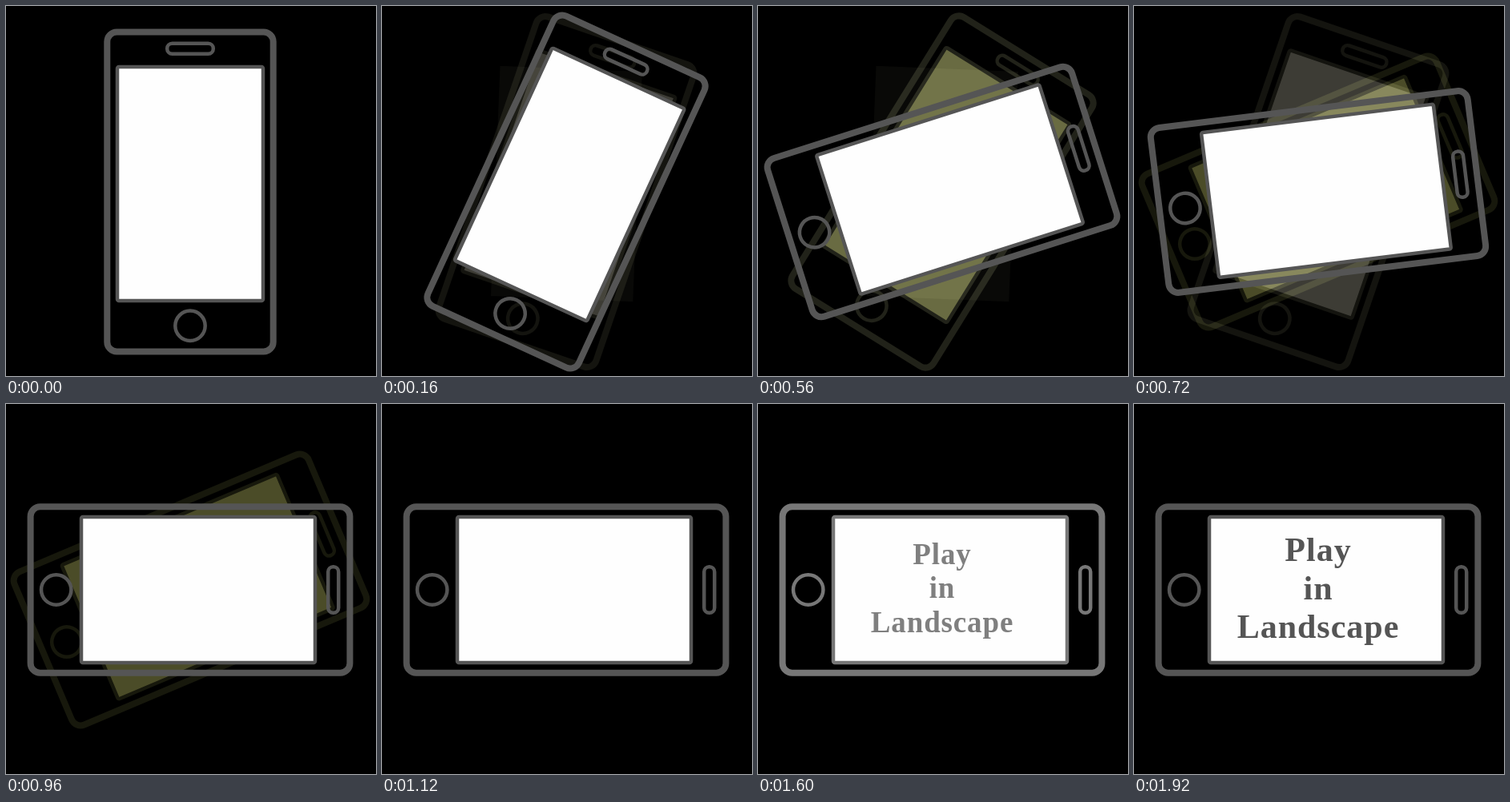
Animation, 462 px wide and 462 px high, one loop 2.4 s. Source, as an HTML page:

```html
<!DOCTYPE html>
<html lang="en">
<head>
<meta charset="utf-8">
<title>Play in Landscape</title>
<style>
  html, body { margin: 0; width: 100%; height: 100%; overflow: hidden; background: #000; }
  svg { display: block; width: 100%; height: 100%; }
  .phone { color: #555; --screen: #fefefe; }
  .ghost { mix-blend-mode: plus-lighter; }
  text {
    font: bold 42px "Liberation Serif", "Times New Roman", serif;
    letter-spacing: 1px; text-anchor: middle; fill: #555;
  }
</style>
</head>
<body>
<svg viewBox="0 0 462 462">
  <defs>
    <g id="phone" fill="none" stroke="currentColor">
      <rect x="-103.7" y="-199.4" width="207.4" height="398.8" rx="12" stroke-width="8"/>
      <rect x="-91" y="-156" width="182" height="292" rx="2" stroke-width="4.5" style="fill:var(--screen)"/>
      <rect x="-28.8" y="-185.2" width="57.6" height="13" rx="6.3" stroke-width="4.5"/>
      <circle cy="167.3" r="18.7" stroke-width="4.5"/>
    </g>
  </defs>
  <rect width="462" height="462"/>
  <g id="ghosts"></g>
  <use id="main" class="phone" href="#phone"/>
  <g id="message">
    <text x="230" y="195.5">Play</text>
    <text x="230" y="244">in</text>
    <text x="230" y="292">Landscape</text>
  </g>
</svg>
<script>
const LOOP = 2400, STEP = 80, LAST = 1920;
const main = document.getElementById('main');
const message = document.getElementById('message');
const clamp = (v, lo, hi) => Math.min(hi, Math.max(lo, v));
const pose = angle => `translate(230 232) rotate(${angle})`;

// Dim afterimages left behind by the turn
const ghosts = [
  { angle: 2.3,  from: 160, to: 640,  screen: '#090907', line: '#000' },
  { angle: 18.9, from: 160, to: 240,  screen: '#3d3c35', line: '#14140f' },
  { angle: 25.3, from: 240, to: 400,  screen: '#4f5030', line: '#191a10' },
  { angle: 31.8, from: 400, to: 640,  screen: '#696b42', line: '#212219' },
  { angle: 18.9, from: 640, to: 800,  screen: '#3d3c35', line: '#14140f' },
  { angle: 67.1, from: 640, to: 1120, screen: '#4b4c28', line: '#17180c' }
];

for (const ghost of ghosts) {
  const node = document.createElementNS('http://www.w3.org/2000/svg', 'use');
  node.setAttribute('href', '#phone');
  node.setAttribute('class', 'ghost');
  node.setAttribute('transform', pose(ghost.angle));
  node.style.color = ghost.line;
  node.style.setProperty('--screen', ghost.screen);
  document.getElementById('ghosts').append(node);
  ghost.node = node;
}

function turn(t) {
  return t >= 960 ? 90 : Math.max(0, 90 - (0.0097 * (993 - t)) ** 2);
}

function draw(time) {
  const t = Math.min(LAST, Math.floor(time % LOOP / STEP) * STEP);
  main.setAttribute('transform', pose(turn(t)));
  for (const { node, from, to } of ghosts) {
    node.style.display = t >= from && t < to ? '' : 'none';
  }

  // The lines lighten while the message fades in and grows
  const p = clamp((t - 1120) / 640, 0, 1);
  const grey = Math.round(85 + 180 * p * (1 - p));
  main.style.color = `rgb(${grey},${grey},${grey})`;
  message.setAttribute('opacity', p);
  message.setAttribute('transform',
    `translate(230 231) scale(${0.52 + 0.48 * p}) translate(-230 -231)`);
}

const start = performance.now();
function tick() {
  draw(performance.now() - start);
  requestAnimationFrame(tick);
}
tick();
</script>
</body>
</html>
```
